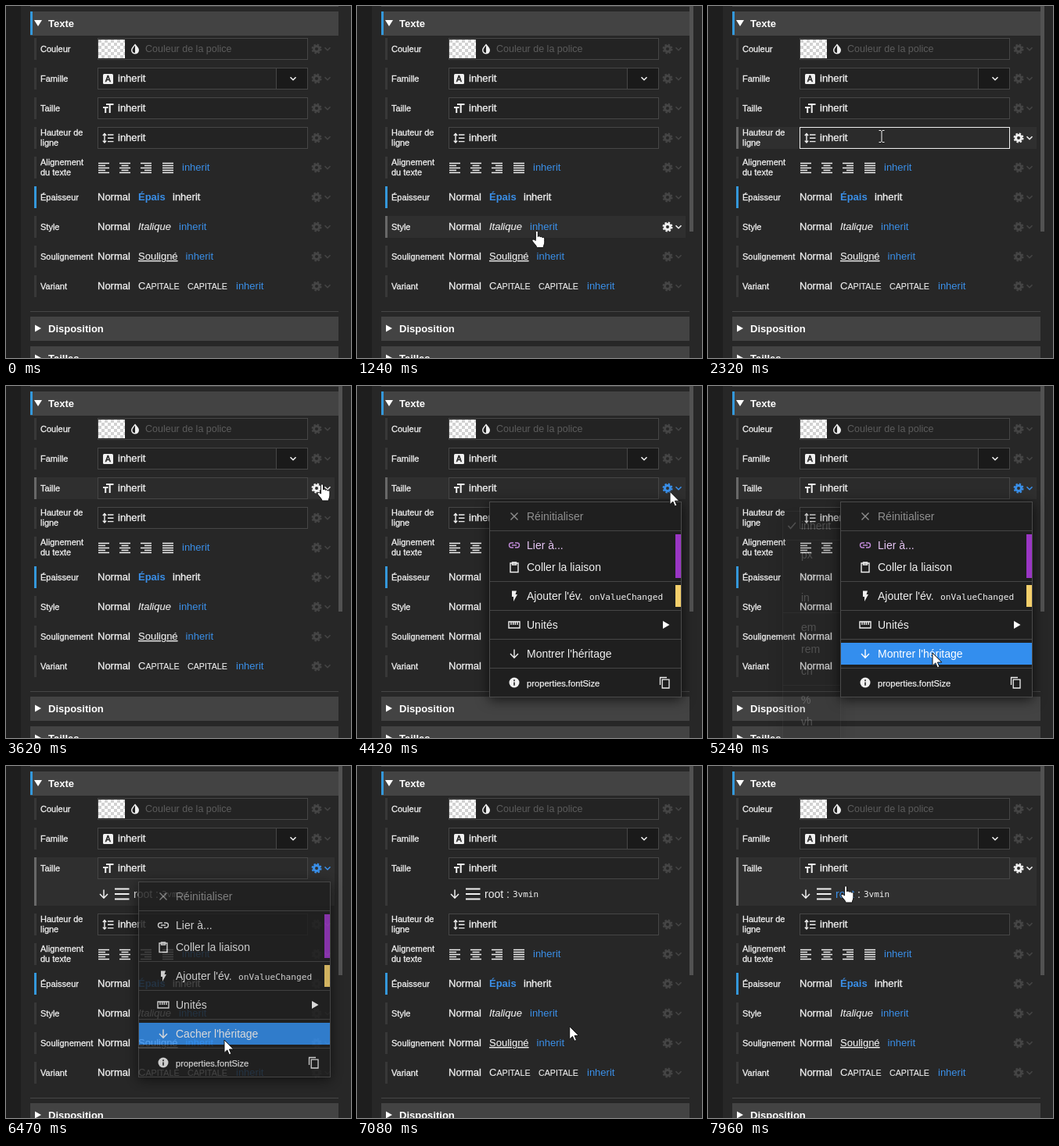
Write an HTML page that moves like this. It is 441x451 px and loops after 8 s.

```html
<!DOCTYPE html>
<html lang="fr">
<head>
<meta charset="utf-8">
<style>
html, body { margin: 0; width: 100%; height: 100%; overflow: hidden; background: #262626; }
svg { display: block; width: 441px; height: 451px; font-family: "Liberation Sans", Arial, sans-serif; }
text { white-space: pre; }
.mono { font-family: "DejaVu Sans Mono", monospace; }
</style>
</head>
<body>
<svg id="stage" viewBox="0 0 441 451"></svg>
<script>
const LOOP = 8000;
const BLUE = '#3a8fe8', WHITE = '#f0f0f0', LINE = '#464646', DIM = '#454545';
const MENU_OPEN = 3960, EXPAND = 6130, RELABEL = 6270, MENU_FADE = 6470, MENU_GONE = 6680;
const stage = document.getElementById('stage');

// Pointer path: time, x, y
const path = [
  [760, 236, 440], [980, 230, 290], [1180, 230, 290], [1920, 222, 166], [1990, 222, 167],
  [2320, 222, 167], [3020, 250, 119], [3140, 250, 119], [3620, 404, 125], [3890, 406, 126],
  [4350, 406, 126], [4820, 309, 276], [5100, 288, 341], [5240, 287, 342], [5450, 279, 339],
  [5720, 279, 339], [5850, 267, 350], [5990, 279, 351], [6940, 279, 351], [7690, 200, 163],
  [7750, 200, 163], [7960, 176, 153]
];
const submenuFade = [[4960, 0], [5100, .6], [5240, .2], [5380, 0]];

function at(keys, t, ease = true) {
  if (t <= keys[0][0]) return keys[0].slice(1);
  for (let i = 1; i < keys.length; i++) {
    const [a, ...from] = keys[i - 1], [b, ...to] = keys[i];
    if (t < b) {
      let k = (t - a) / (b - a);
      if (ease) k = k * k * (3 - 2 * k);
      return from.map((v, j) => v + (to[j] - v) * k);
    }
  }
  return keys[keys.length - 1].slice(1);
}

const rect = (x, y, w, h, fill, more = '') =>
  `<rect x="${x}" y="${y}" width="${w}" height="${h}" fill="${fill}" ${more}/>`;
const frame = (x, y, w, h, color, fill = 'none') =>
  rect(x + .5, y + .5, w - 1, h - 1, fill, `stroke="${color}"`);
const text = (x, y, s, size = 13, fill = WHITE, weight = .3, more = '') =>
  `<text x="${x}" y="${y}" font-size="${size}" fill="${fill}" stroke="${fill}" stroke-width="${weight}" ${more}>${s}</text>`;
const stroke = (x, y, d, color, width = 1.5) =>
  `<path transform="translate(${x} ${y})" d="${d}" fill="none" stroke="${color}" stroke-width="${width}"/>`;
const shape = (x, y, d, fill, more = '') =>
  `<path transform="translate(${x} ${y})" d="${d}" fill="${fill}" ${more}/>`;
const chevron = (x, y, color) => stroke(x, y, 'M-3.5-1.8L0 1.7L3.5-1.8', color, 1.6);
const arrowDown = (x, y, color) => stroke(x, y, 'M0-5.5V5M-5 0L0 5.2L5 0', color);

const gear = (x, y, color) =>
  `<g fill="none" stroke="${color}"><circle cx="${x}" cy="${y}" r="3.5" stroke-width="3"/>` +
  `<circle cx="${x}" cy="${y}" r="5.5" stroke-width="2" stroke-dasharray="2.4 1.92"/></g>` +
  chevron(x + 14, y, color);

function alignIcon(x, y, kind) {
  let d = '';
  for (let i = 0; i < 5; i++) {
    const w = i % 2 && kind < 3 ? 9 : 14;
    d += `M${[0, (14 - w) / 2, 14 - w, 0][kind]} ${-6 + i * 3}h${w}`;
  }
  return stroke(x, y, d, WHITE, 1.4);
}

const values = (y, word, x, more = '') =>
  text(117, y + 4, 'Normal') + text(169, y + 4, word, 13, WHITE, .1, more) +
  text(x, y + 4, 'inherit', 13, BLUE, 0);

const field = (y, hot, w = 269) => frame(117, y - 14, w, 28, hot ? WHITE : LINE, '#00000018');
const inherit = y => text(143, y + 4, 'inherit');

const rows = [
  [['Couleur'], (y, hot) => field(y, hot) + rect(118, y - 12, 34, 24, 'url(#check)') +
    shape(165, y, 'M0-6.5C3-3 5-1 5 1.6A5 5 0 0 1-5 1.6C-5-1-3-3 0-6.5M0-4.2V5A3.4 3.4 0 0 1-3.5 1.6C-3.5 0-2-2 0-4.2', WHITE, 'fill-rule="evenodd"') +
    text(178, y + 4, 'Couleur de la police', 12.5, '#5c5c5c', 0)],
  [['Famille'], (y, hot) => field(y, hot, 229) + frame(345, y - 14, 41, 28, LINE, '#1a1a1a') +
    chevron(367, y, WHITE) + rect(124, y - 6, 13, 13, WHITE, 'rx="1.5"') +
    text(127, y + 4, 'A', 10, '#222', .6) + inherit(y)],
  [['Taille'], (y, hot) => field(y, hot) +
    stroke(124, y, 'M4-5H13.5M8.7-5V6M0-1H6.5M3.2-1V6', WHITE, 2) + inherit(y)],
  [['Hauteur de', 'ligne'], (y, hot) => field(y, hot) +
    stroke(124, y, 'M2-5V6M-.2-3L2-5.4L4.2-3M-.2 3.6L2 6L4.2 3.6M6-4H13.5M6 .3H13.5M6 4.6H13.5', WHITE, 1.4) + inherit(y)],
  [['Alignement', 'du texte'], y => [118, 145, 172, 200].map((x, i) => alignIcon(x, y + .5, i)).join('') +
    text(225, y + 4, 'inherit', 13, BLUE, 0)],
  [['Épaisseur'], y => text(117, y + 4, 'Normal') +
    text(169, y + 4, 'Épais', 13, BLUE, 0, 'font-weight="bold"') + text(213, y + 4, 'inherit')],
  [['Style'], y => values(y, 'Italique', 221, 'font-style="italic"')],
  [['Soulignement'], y => values(y, 'Souligné', 229.6, 'text-decoration="underline"')],
  [['Variant'], y => values(y, 'C<tspan font-size="10.7">APITALE</tspan>', 294) +
    text(232, y + 4, 'CAPITALE', 10.7, WHITE, .1)]
];

function header(y, title, open) {
  return rect(31, y, 394, 31, '#434343') + (open ? rect(31, y, 3, 30, '#3498db') : '') +
    shape(37, y + 15, open ? 'M-1-4H9L4 4Z' : 'M0-4.5V4.5L8 0Z', '#fff') +
    text(54, y + 19.5, title, 13, '#fff', 0, 'font-weight="bold"');
}

const items = [
  [167, 'Réinitialiser', 'M-4.5-4.5L4.5 4.5M-4.5 4.5L4.5-4.5'],
  [204, 'Lier à...', 'M-1-3H-3.5a3 3 0 0 0 0 6H-1M1-3H3.5a3 3 0 0 1 0 6H1M-3 0H3'],
  [232, 'Coller la liaison', 'M-5-5H5V6.5H-5ZM-2.5-6H2.5V-3H-2.5Z'],
  [269, "Ajouter l'év.", ''],
  [306, 'Unités', 'M-7-4H7V4H-7ZM-4-4V0M-1.3-4V0M1.3-4V0M4-4V0'],
  [343, '', 'M0-5.5V5M-5 0L0 5.2L5 0'],
  [380, 'properties.fontSize', '']
];

function menu(t, x, y) {
  let s = rect(169, 148, 246, 251, '#1f1f1f', 'style="filter:drop-shadow(0 3px 8px #000a)"') +
    frame(169, 148, 246, 251, '#4b4b4b');
  for (const line of [185, 250, 287, 324, 361]) s += rect(170, line, 244, 1, '#464646');
  s += rect(407, 190, 7, 56, '#9a36c4') + rect(407, 255, 7, 28, '#f4cf6b');
  items.forEach(([cy, label, icon], i) => {
    const hot = i && i < 6 && x > 170 && x < 414 && Math.abs(y - cy) < 14;
    let color = i ? WHITE : '#8f8f8f', tint = color;
    if (i == 1 && t < EXPAND) { color = '#e6c5f4'; tint = '#c08ad8'; }
    if (hot) {
      s += rect(170, cy - 14, 244, 28, i < 3 ? '#9a36c4' : i == 3 ? '#ffd15c' : '#338eee');
      color = tint = i == 3 ? '#222' : '#fff';
    }
    if (i == 5) label = (t < RELABEL ? 'Montrer' : 'Cacher') + " l'héritage";
    s += stroke(201, cy, icon, tint, 1.4) +
      text(217, cy + (i == 6 ? 4.5 : 5), label, i == 6 ? 11.2 : 14, color, i == 6 ? .25 : 0);
    if (i == 3) s += shape(201, cy, 'M-3-6.5H3L1.5-2H4L-1 7V1H-3Z', color) +
      text(297, cy + 5, 'onValueChanged', 11.2, color, 0, 'class="mono"');
    if (i == 4) s += shape(391, cy, 'M0-5V5L8.5 0Z', '#fff');
    if (i == 6) s += `<circle cx="201" cy="${cy}" r="6.5" fill="${WHITE}"/>` +
      stroke(201, cy, 'M0-3.8V-1.8M0-.6V3.8', '#222', 1.6) +
      stroke(393, cy, 'M-5.5 3V-6.5H3M-2.8-3.8H6V7H-2.8Z', WHITE, 1.3);
  });
  return s;
}

function submenu() {
  const units = { inherit: 179, px: 216, cm: 244, in: 271, em: 309, rem: 337, ch: 365, '%': 402, vh: 430 };
  let s = rect(95, 160, 75, 330, '#1f1f1f', 'style="filter:drop-shadow(0 3px 10px #000a)"') +
    frame(95, 160, 75, 330, '#4b4b4b');
  for (const y of [197, 290, 383]) s += rect(96, y, 73, 1, '#464646');
  s += stroke(107, 179, 'M-4.5 0L-1.5 3.5L5-4', WHITE);
  for (const u in units) s += text(119, units[u] + 5, u, 14, WHITE, 0);
  return s;
}

const cursors = {
  arrow: 'M0 0V16.5L3.8 12.9L6.3 18.8L8.9 17.7L6.4 12H11.8Z',
  hand: 'M-1.5 12V2C-1.5 .2 1.5 .2 1.5 2V8C2 6.6 4.3 6.8 4.4 8.4C5 7.4 7 7.6 7.1 9.2C8 8.4 9.9 8.8 9.9 10.6V15C9.9 18 8.5 19 8.3 22H0C-.5 19-3.5 17-5.7 13.6C-6.7 11.6-3.9 10.4-1.5 13Z'
};
function pointer(kind, x, y) {
  if (kind == 'beam') {
    const d = 'M-3.5-7.5H-1L0-6.5L1-7.5H3.5M0-6.5V6.5M-3.5 7.5H-1L0 6.5L1 7.5H3.5';
    return stroke(x, y, d, '#222', 2.6) + stroke(x, y, d, '#fff', 1);
  }
  return shape(x, y, cursors[kind], '#fff', 'stroke="#111" stroke-width="1" stroke-linejoin="round"');
}

function draw(t) {
  const [x, y] = at(path, t);
  const visible = t >= 760, open = t >= MENU_OPEN && t < MENU_GONE, expanded = t >= EXPAND;
  const shift = expanded ? 34 : 0;
  let kind = 'arrow';
  let s = '<defs><pattern id="check" width="8" height="8" x="118" y="43" patternUnits="userSpaceOnUse">' +
    rect(0, 0, 8, 8, '#fff') + rect(0, 0, 4, 4, '#d2d2d2') + rect(4, 4, 4, 4, '#d2d2d2') + '</pattern></defs>' +
    rect(0, 0, 441, 451, '#272727') + rect(0, 0, 19, 451, '#1e1e1e') +
    rect(31, 0, 394, 1, LINE) + header(7, 'Texte', true);

  rows.forEach(([label, content], i) => {
    const cy = 55 + 38 * i + (i > 2 ? shift : 0);
    const h = i == 2 ? 28 + shift : 28;
    const over = visible && !open && y >= cy - 14 && y < cy - 14 + h;
    const active = over || (open && i == 2);
    const inField = over && i < 4 && x > 117 && x < (i == 1 ? 345 : 386) && y < cy + 14;
    const onLink = i > 3 && Math.abs(y - cy) < 7 && x < 265;
    const onRoot = i == 2 && expanded && y > 152 && x > 163 && x < 235;
    if (inField) kind = 'beam';
    else if (over && (x > 388 || onLink || onRoot)) kind = 'hand';

    if (active) s += rect(36, cy - 14, 384, h, '#2f2f2f');
    s += rect(36, cy - 14, 3, h, i == 5 ? '#3498db' : active ? '#686868' : '#383838');
    label.forEach((word, j) => s += text(44, cy + (label.length > 1 ? -3 + 13 * j : 4), word, 11));
    s += content(cy, inField) + gear(397, cy, open && i == 2 ? BLUE : over ? WHITE : DIM);
    if (i == 2 && expanded) {
      s += arrowDown(125, 164, WHITE) + stroke(139, 164, 'M0-6.5H18.5M0 0H18.5M0 6.5H18.5', WHITE, 2) +
        text(163, 169, `<tspan fill="${over && onRoot ? BLUE : WHITE}">root</tspan> :`, 14, WHITE, 0) +
        text(199, 168, '3vmin', 11, WHITE, 0, 'class="mono"');
    }
  });

  s += rect(31, 391 + shift, 394, 1, LINE) + header(398 + shift, 'Disposition') + header(436 + shift, 'Tailles');
  const bar = Math.min(1, Math.max(0, (t - 690) / 290));
  if (visible) s += rect(425, 0, 5, expanded ? 268 : 289, '#525252', `opacity="${bar}"`);

  if (open) {
    const [fade] = at(submenuFade, t, false);
    if (fade > 0) s += `<g opacity="${fade}">${submenu()}</g>`;
    const alpha = t < 4020 ? .6 : t < MENU_FADE ? 1 : .83 * (MENU_GONE - t) / (MENU_GONE - MENU_FADE);
    s += `<g opacity="${alpha}">${menu(t, x, y)}</g>`;
  }
  if (visible) s += pointer(kind, x, y);
  stage.innerHTML = s;
}

const start = performance.now();
function tick() {
  draw((performance.now() - start) % LOOP);
  requestAnimationFrame(tick);
}
tick();
</script>
</body>
</html>
```
